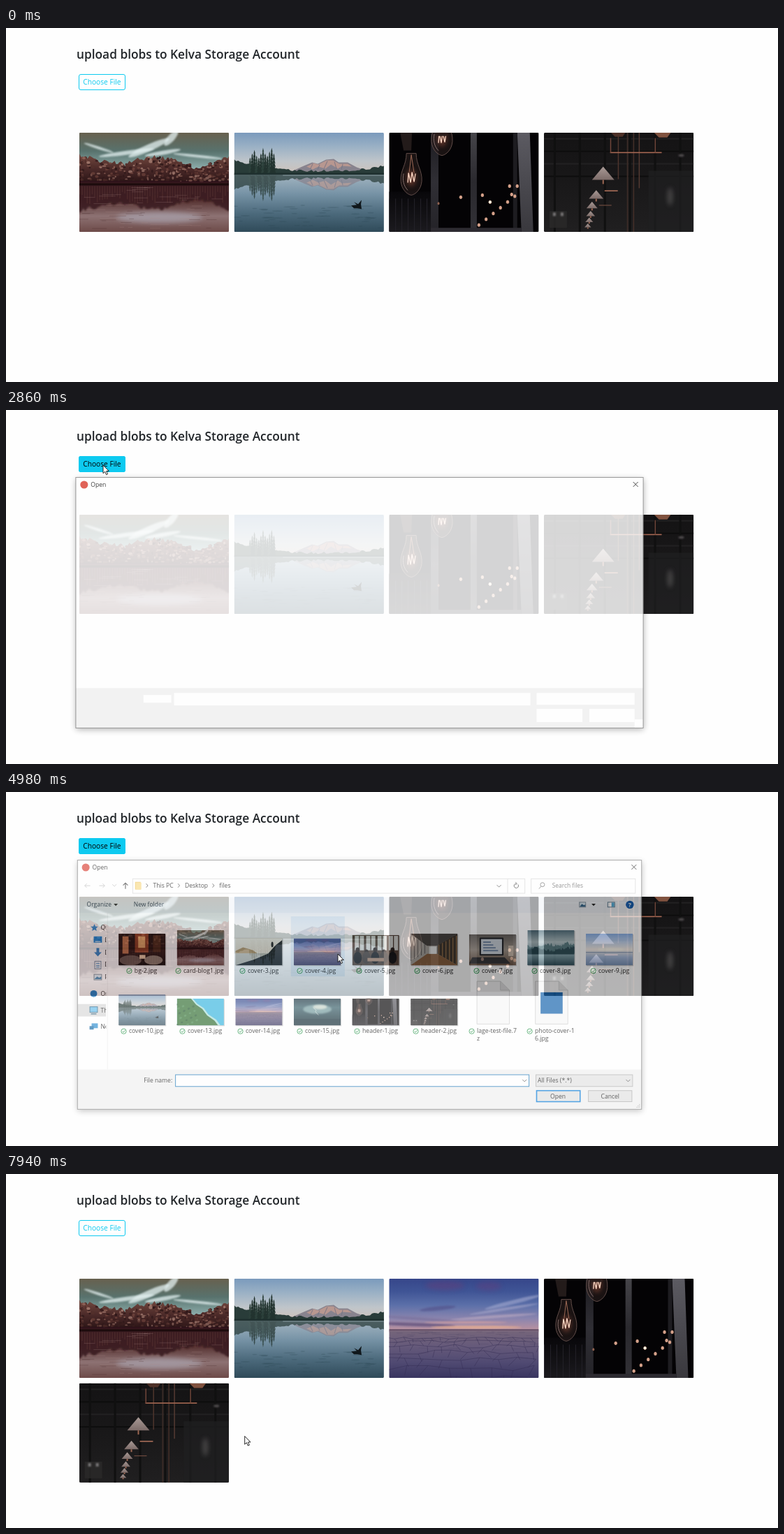
An HTML page that plays this animation: 1105 px wide and 507 px high, repeating every 8 s.

```html
<!DOCTYPE html>
<html lang="en">
<head>
<meta charset="utf-8">
<title>Blob upload</title>
<style>
html, body { margin: 0; width: 100%; height: 100%; overflow: hidden; background: #fefefe; }
svg { display: block; width: 100vw; height: 100vh; }
text { font-family: "Open Sans", "Noto Sans", sans-serif; white-space: pre; }
</style>
</head>
<body>
<svg id="stage" viewBox="0 0 1105 507"></svg>
<script>
const LOOP = 8000, CARD_W = 214.5, CARD_H = 142.5;
const clamp = v => Math.max(0, Math.min(1, v));
const ramp = (t, a, b) => clamp((t - a) / (b - a));
const smooth = p => p * p * (3 - 2 * p);

// Markup helpers
const rect = (x, y, w, h, fill, more = '') => `<rect x="${x}" y="${y}" width="${w}" height="${h}" fill="${fill}" ${more}/>`;
const oval = (x, y, rx, ry, fill, more = '') => `<ellipse cx="${x}" cy="${y}" rx="${rx}" ry="${ry}" fill="${fill}" ${more}/>`;
const path = (d, fill, more = '') => `<path d="${d}" fill="${fill}" ${more}/>`;
const line = (d, color, width = 1, more = '') => path(d, 'none', `stroke="${color}" stroke-width="${width}" ${more}`);
const text = (x, y, s, size = 8.7, fill = '#1a1a1a', more = '') => `<text x="${x}" y="${y}" font-size="${size}" fill="${fill}" ${more}>${s}</text>`;
const many = (n, f) => Array.from({ length: n }, (_, i) => f(i)).join('');
const soft = 'filter="url(#soft)"', mist = 'filter="url(#mist)"';

function random(seed) {
  return () => (seed = (seed * 16807) % 2147483647) / 2147483647;
}

const blur = (id, size) => `<filter id="${id}" x="-50%" y="-50%" width="200%" height="200%"><feGaussianBlur stdDeviation="${size}"/></filter>`;
let defs = blur('soft', 3) + blur('mist', 1.3) +
  '<filter id="shade" x="-5%" y="-5%" width="110%" height="115%"><feGaussianBlur stdDeviation="5"/></filter>' +
  `<clipPath id="card">${rect(0, 0, CARD_W, CARD_H, '#000', 'rx="2"')}</clipPath>` +
  '<clipPath id="loaded"><rect id="loadedBox" width="215" height="143"/></clipPath>' +
  `<clipPath id="nav">${rect(97, 172, 42, 227, '#000')}</clipPath>`;
let gradients = 0;

function fade(...colors) {
  const id = 'grad' + gradients++;
  defs += `<linearGradient id="${id}" x2="0" y2="1">` +
    colors.map((c, i) => `<stop offset="${i / (colors.length - 1)}" stop-color="${c}"/>`).join('') + '</linearGradient>';
  return `url(#${id})`;
}

function photo(id, body) {
  defs += `<symbol id="${id}" viewBox="0 0 215 143" preserveAspectRatio="none">${body}</symbol>`;
}

// Jagged skyline through evenly spaced heights, closed at the base
function ridge(heights, base, rough, seed) {
  const r = random(seed), n = heights.length - 1;
  let d = `M0 ${base}`;
  for (let x = 0; x <= 216; x += 3) {
    const u = Math.min(x / 215 * n, n - .001), i = Math.floor(u);
    const y = heights[i] + (heights[i + 1] - heights[i]) * (u - i) + (r() - .5) * rough;
    d += `L${x} ${y.toFixed(1)}`;
  }
  return d + `V${base}Z`;
}

function spruce(x, base, h, w) {
  let left = `M${x} ${base - h}`, right = '';
  for (let i = 1; i <= 6; i++) {
    const y = base - h + h * i / 6, half = w * (.25 + i / 8);
    left += `L${x - half} ${y}L${x - half * .4} ${y - 1.5}`;
    right = `L${x + half * .4} ${y - 1.5}L${x + half} ${y}` + right;
  }
  return left + right + 'Z';
}

function forest() {
  const r = random(71), tones = ['#6f443c', '#8d6156', '#3c1f1f', '#9f776c', '#2f1819', '#54302c'];
  const heights = [34, 38, 44, 45, 39, 35, 37, 46, 52, 43, 33];
  const trees = path(ridge(heights, 76, 8, 5), fade('#74493f', '#4a2928', '#241012'));
  const leaves = many(330, () => {
    const x = r() * 215, top = heights[Math.min(10, Math.round(x / 21.5))], depth = r();
    const tone = tones[Math.floor(r() * 6)];
    return oval(x.toFixed(1), (top + depth * (70 - top)).toFixed(1), 1 + r() * 2, .8 + r() * 1.5, tone, `opacity="${1 - depth * .45}"`);
  });
  const streaks = many(70, () => rect((r() * 205 - 5).toFixed(1), (78 + r() * 64).toFixed(1), 6 + r() * 22, .8, r() < .5 ? '#a88785' : '#3f2122', 'opacity=".3"'));
  const cloud = (x, y, rx, ry, a) => oval(x, y, rx, ry, '#e3f0f0', `transform="rotate(${a} ${x} ${y})" ${mist} opacity=".75"`);
  return rect(0, 0, 215, 80, fade('#67604e', '#58726d', '#8fb0ae', '#bccdca')) +
    cloud(68, 29, 40, 3, -8) + cloud(100, 22, 32, 5, -24) + cloud(132, 8, 14, 5, -48) + cloud(28, 22, 22, 2, 18) +
    cloud(120, 29, 26, 3, -10) + cloud(170, 34, 35, 2, 6) + trees + leaves +
    rect(0, 74, 215, 69, fade('#3d2022', '#54302f', '#8d7273', '#6d4a48')) +
    oval(115, 122, 62, 8, '#a8a0aa', `opacity=".75" ${soft}`) +
    `<g transform="translate(0 147) scale(1 -1)">${path(ridge(heights.map(h => h + 1), 76, 7, 9), '#3a1d20', `opacity=".9" ${mist}`)}</g>` +
    rect(0, 73, 215, 3, '#1c0b0c') + many(60, i => rect(i * 3.6, 77, 1.6, 8 + r() * 18, '#6a423e', 'opacity=".3"')) + streaks;
}

function lake() {
  const firs = many(12, i => path(spruce(23 + i * 3.1, 60, [24, 30, 35, 27][i % 4] + (i > 5 ? 3 : 0), 3.6), i % 3 ? '#22332f' : '#2c403b'));
  const hills = path(ridge([40, 46, 51, 53, 54, 55, 55, 55, 54, 52, 48], 61, 3, 12), '#293c39');
  const peak = path('M82 56L100 48L112 43L120 45L132 39L143 38L150 43L163 43L176 50L194 56Z', '#88838e') +
    path('M104 49L114 44L121 46L133 40L142 40L151 45L163 45L169 49L155 48L149 52L139 46L131 52L121 49L113 53Z', '#b89790') +
    line('M113 45l-4 8M123 46l-3 7M134 41l-5 11M144 42l3 10M156 45l-2 8', '#747383', 1.2, 'opacity=".7"');
  const shore = peak + hills + firs;
  const r = random(31);
  return rect(0, 0, 215, 62, fade('#7a9abc', '#9bb1c5', '#bfc5ca', '#d1c2b8')) + shore +
    rect(0, 60, 215, 83, fade('#a4b6c2', '#7793a6', '#4d6b7d', '#2f4a59')) +
    `<g transform="translate(0 121) scale(1 -1)" opacity=".72">${shore}</g>` +
    rect(0, 58, 215, 2.5, '#1f302f') + line('M70 61.5H215', '#a9bac3', .6) +
    many(50, () => oval(r() * 215, 103 + r() * 38, 3 + r() * 6, .8, '#2a4451', 'opacity=".25"')) +
    path('M168 105L176 104L172 100L178 103L183 97L182 103L183 110L177 109L172 109Z', '#10171b');
}

function bulb() {
  const glow = (x, y, s = 2.2) => oval(x, y, s, s * 1.2, '#d5a18a');
  const glass = (x, y) => `<g transform="translate(${x} ${y})">` +
    path('M-7 -32C-7 -15 -16 -8 -15 8C-14 20 -6 27 0 28C6 27 14 20 15 8C16 -8 7 -15 7 -32Z', '#241a1a', 'fill-opacity=".7" stroke="#6b5450" stroke-width=".9"') +
    oval(0, 3, 7, 12, '#8c4c3a', `opacity=".55" ${soft}`) + line('M-11 -3C-13 6 -11 15 -5 21', '#a08580', .8) +
    line('M-5 10L-4 -4L-1 10L1 -5L4 9L6 -3', '#ffd9c5', 1.3) + line('M-3 -5L0 -30L4 -4', '#9c6955', 1) + '</g>';
  return rect(0, 0, 215, 143, '#040305') +
    rect(0, 85, 62, 58, fade('#08070a', '#1b1a1e')) + many(7, i => rect(i * 9, 95, 1, 48, '#25232a')) +
    rect(60, 0, 11, 143, fade('#1c1b20', '#302f35', '#242328')) +
    rect(117, 0, 9, 143, fade('#454449', '#2a292e', '#323136')) +
    path('M184 0H202L207 143H190Z', fade('#5c5b62', '#4a494f', '#39383d')) +
    rect(178, 0, 6, 143, '#1d1c20') + rect(60, 137, 130, 6, '#2d2b31') +
    path('M16 0H33L32 26H21Z', '#231b1a') + glass(32, 62) + glass(76, 5) + rect(68, 0, 15, 5, '#2a1c1a') +
    many(6, i => glow(129 + i * 10.3, 133 - i * 8.3)) +
    [[103, 93], [134, 90], [173, 77], [184, 77], [145, 100], [176, 89]].map(p => glow(...p)).join('') +
    oval(145, 100, 2, 2, '#fff0df') + oval(71, 102, 1.5, 2, '#8f614f');
}

function lamps() {
  const cone = (x, y, s) => path(`M${x} ${y - 11 * s}L${x + 16 * s} ${y + 8 * s}H${x - 16 * s}Z`, fade('#a99a96', '#7d6c69')) +
    rect(x - 1, y + 8 * s, 2, 6 * s, '#9c6753');
  const copper = '#70463a';
  return rect(0, 0, 215, 143, fade('#141314', '#191819', '#201f20')) +
    many(4, i => rect(0, 8 + i * 18, 215, 2, i % 2 ? '#0d0d0d' : '#222122')) +
    many(6, i => rect(14 + i * 36, 0, 3, 143, '#101010')) +
    rect(150, 55, 65, 88, '#1f1f20', 'opacity=".75"') +
    oval(181, 92, 4, 13, '#565455', `opacity=".7" ${soft}`) + oval(197, 33, 4, 2, '#4d494b', mist) +
    rect(8, 113, 25, 24, '#2b2a2a', 'opacity=".8"') + many(2, i => rect(13 + i * 11, 115, 4, 5, '#777576', mist)) +
    rect(106, 0, 1.5, 67, '#4e352d') + rect(119, 0, 2, 143, '#3a2b27') + rect(128, 0, 1.5, 143, '#453029') + rect(136, 0, 1.5, 80, '#543a32') +
    rect(95, 28, 74, 1.6, '#a66853') + rect(95, 8, 1.5, 21, copper) + rect(159, 8, 1.5, 21, copper) +
    path('M96 0H117L113 6H102Z', '#4d3027') + path('M158 0H182L177 7H165Z', '#80523f') +
    rect(87, 83, 19, 1.6, '#a96e59') + rect(79, 104, 18, 1.2, '#6e4a3e') +
    cone(85, 60, 1) + cone(75, 90, .65) + cone(69, 105, .5) + cone(67, 117, .4) + cone(65, 126, .35) + cone(63, 134, .3);
}

function dusk() {
  const r = random(17);
  let cracks = '';
  for (let row = 2; row < 9; row++) {
    const y = 82 + row * row * .95, gap = 6 + row * 3.5;
    cracks += `M-5 ${y}`;
    for (let x = -5; x < 220; x += gap) {
      const jog = y + (r() - .5) * (1 + row);
      cracks += `L${x} ${jog}l${(r() - .5) * gap} ${1.9 * row + 1}M${x} ${jog}`;
    }
  }
  const cloud = (x, y, rx, ry, fill, a, o) => oval(x, y, rx, ry, fill, `transform="rotate(${a} ${x} ${y})" ${mist} opacity="${o}"`);
  return rect(0, 0, 215, 77, fade('#36468a', '#405596', '#5c70a9', '#8b85ae', '#c3949c')) +
    oval(80, 10, 28, 7, '#653d78', `opacity=".45" ${soft}`) + oval(143, 11, 18, 7, '#653d7c', `opacity=".4" ${soft}`) +
    cloud(70, 43, 26, 3, '#514f88', -6, .6) + cloud(178, 34, 42, 3, '#a3a9cf', -14, .6) + cloud(165, 44, 50, 2, '#aaa9cb', -9, .6) +
    cloud(150, 55, 62, 2, '#b8a7c0', -4, .7) + cloud(45, 58, 55, 2, '#7c739e', 4, .8) + cloud(35, 66, 60, 2.4, '#63527d', 2, .8) +
    cloud(110, 63, 60, 1.5, '#d6a2a1', 0, .7) + cloud(125, 70, 65, 2, '#e9b091', 0, .8) +
    rect(0, 73, 215, 2, '#594760') + rect(0, 75, 215, 68, fade('#75657a', '#65597a', '#504a72', '#393560')) +
    many(60, () => rect(r() * 205, 76 + r() * r() * 40, 4 + r() * 12, .6, '#4d4261', 'opacity=".4"')) +
    line(cracks, '#302b51', .7, 'opacity=".6"');
}

photo('forest', forest());
photo('lake', lake());
photo('bulb', bulb());
photo('lamps', lamps());
photo('dusk', dusk());
photo('room', rect(0, 0, 215, 143, fade('#160c0b', '#2b1512', '#0c0908')) + rect(18, 12, 28, 78, '#bd7149') + rect(75, 0, 62, 85, '#8c3b20') +
  rect(90, 12, 32, 52, '#e2a365') + rect(158, 8, 35, 75, '#492718') + oval(55, 120, 50, 23, '#615049') + oval(160, 119, 42, 21, '#86766a') + rect(96, 96, 27, 17, '#e6c6a3'));
photo('cliff', rect(0, 0, 215, 143, fade('#f1eee5', '#e9ded0', '#b8bdb9')) + path('M0 69L35 50L80 64L105 85H0Z', '#b09064') +
  rect(0, 80, 215, 63, '#b6b4aa') + path('M215 12L183 40L150 82L85 113L0 143H215Z', '#14171a') + oval(169, 35, 5, 14, '#171719'));
photo('team', rect(0, 0, 215, 143, '#554238') + many(4, i => rect(12 + i * 52, 4, 42, 68, '#d8d9d4') + rect(31 + i * 52, 4, 4, 68, '#49372e')) +
  many(5, i => oval(25 + i * 40, 70 + i % 2 * 10, 9, 12, '#2b211e') + oval(25 + i * 40, 107, 19, 28, i % 2 ? '#453a36' : '#181719')) + rect(70, 108, 75, 16, '#af8870'));
photo('hall', rect(0, 0, 215, 143, '#aaa59e') + path('M0 0H215L120 55H75Z', '#4b4743') + path('M215 0V143L123 91V52Z', '#40382f') +
  many(6, i => line(`M${130 + i * 16} ${50 - i * 8}V${93 + i * 10}`, '#b68858', 3)) + path('M0 143L76 91H123L215 143Z', '#88603f') +
  many(5, i => rect(i * 16, 12 + i * 7, 2, 110 - i * 15, '#353638')) + rect(85, 58, 33, 33, '#d9dad7'));
photo('desk', rect(0, 0, 215, 143, fade('#68635f', '#a59b90', '#6c5545')) + rect(48, 15, 110, 83, '#25282c', 'rx="4"') +
  rect(55, 22, 96, 69, '#d3dbe4') + many(4, i => rect(65, 33 + i * 13, 35 + i * 11, 6, '#768caa')) + path('M15 106H163L190 135H0Z', '#363638') + rect(180, 52, 23, 48, '#d2c2b2'));
photo('mistyLake', rect(0, 0, 215, 143, fade('#51717f', '#b5c6c9', '#688994', '#2d5260')) + path(ridge([66, 73, 61, 58, 66, 51, 62], 94, 12, 8), '#557a80') +
  path(ridge([80, 70, 78, 85, 77, 73, 68], 98, 11, 4), '#284952') + rect(0, 99, 215, 44, fade('#80a0a8', '#264753')));
photo('pale', rect(0, 0, 215, 143, fade('#87b0ea', '#c0d4f1', '#f8f0e8', '#9fb4d6', '#718bb0')) + rect(0, 83, 215, 3, '#758bab') + oval(115, 71, 60, 6, '#fffbef', soft));
photo('coast', rect(0, 0, 215, 143, '#38b6df') + path('M0 0H72L93 28L123 51L144 84L180 112L199 143H0Z', '#a8dfda') +
  path('M0 0H64L88 33L116 56L138 90L172 118L188 143H0Z', '#316d31') + many(50, i => oval(i * 37 % 95, 32 + i * 61 % 110, 5, 4, i % 2 ? '#438448' : '#205629')));
photo('storm', rect(0, 0, 215, 143, fade('#17313e', '#385f69', '#203e48', '#102630')) + oval(108, 57, 65, 24, '#729a9d', soft) +
  oval(120, 45, 32, 12, '#c9d6ca', soft) + line('M90 48L103 64L99 70L113 88', '#e4eee9', 2) + rect(0, 108, 215, 35, '#122c36'));

// name, picture, top edge, label start, second label line
const FILES = [
  ['bg-2.jpg', 'room', 202, 180], ['card-blog1.jpg', 'forest', 197, 251], ['cover-3.jpg', 'cliff', 208, 344],
  ['cover-4.jpg', 'dusk', 209, 427], ['cover-5.jpg', 'team', 204, 513], ['cover-6.jpg', 'hall', 202, 597],
  ['cover-7.jpg', 'desk', 203, 683], ['cover-8.jpg', 'mistyLake', 197, 767], ['cover-9.jpg', 'pale', 202, 852],
  ['cover-10.jpg', 'lake', 290, 172], ['cover-13.jpg', 'coast', 296, 257], ['cover-14.jpg', 'dusk', 296, 341],
  ['cover-15.jpg', 'storm', 296, 427], ['header-1.jpg', 'bulb', 296, 510], ['header-2.jpg', 'lamps', 296, 595],
  ['lage-test-file.7', '', 271, 676, 'z'], ['photo-cover-1', 'image', 271, 760, '6.jpg']
];

function sheet(x, y) {
  return path(`M${x} ${y}h34l13 13v49h-47Z`, '#f7f7f7', 'stroke="#d0d0d0"') + path(`M${x + 34} ${y}v13h13`, '#e5e5e5', 'stroke="#d0d0d0"');
}

function fileItem([name, pic, top, labelX, rest], i) {
  const x = 157 + i % 9 * 84.6, bottom = i < 9 ? 248 : 335, label = bottom + 11;
  let art;
  if (rest) art = sheet(x + 11.5, top) + (pic ? rect(x + 19, 287, 32, 31, '#1261ad') : '');
  else art = rect(x + 1, top + 1, 68, bottom - top, '#c9c9c9') + `<use href="#${pic}" x="${x}" y="${top}" width="68" height="${bottom - top}"/>`;
  return art + text(labelX, label, name, 8.8) + (rest ? text(labelX, label + 11, rest, 8.8) : '');
}

const tick = ([, , , x], i) => {
  const y = i < 9 ? 256 : 343.5;
  return `<circle cx="${x - 7.5}" cy="${y}" r="3.7" fill="#fff" stroke="#239447"/>` + line(`M${x - 9.4} ${y}l1.5 1.6l2.5 -3`, '#239447');
};

const chevron = (x, y, color = '#555') => line(`M${x - 3} ${y - 1.5}l3 3l3 -3`, color);
const crumb = x => line(`M${x - 1} 129.5l2.5 2.8l-2.5 2.8`, '#555');

function navPane() {
  const rows = [[193, 'Quick access', 131], [211, 'Desktop', 137], [229, 'Downloads', 137], [247, 'Documents', 137],
    [265, 'Pictures', 137], [289, 'Online', 131], [313, 'This PC', 131], [337, 'Network', 131]];
  return `<g clip-path="url(#nav)">${rect(97, 304, 42, 18, '#d9d9d9')}${rows.map(([y, s, x]) => text(x, y + 3, s)).join('')}` +
    path('M122 188l1.5 3.4l3.8 .4l-2.8 2.5l.8 3.7l-3.3 -1.9l-3.3 1.9l.8 -3.7l-2.8 -2.5l3.8 -.4Z', '#2b8bd8') +
    rect(121, 206, 12, 9, '#1683d8') + rect(123, 213, 8, 1, '#fff') +
    path('M125 223h4v6h3.5l-5.5 6l-5.5 -6h3.5Z', '#3385cc') +
    rect(122.5, 242, 9, 11, '#fff', 'stroke="#7890a5"') + line('M124.5 245h5M124.5 248h5M124.5 250.5h5', '#3d89c4') +
    rect(121.5, 261, 11, 8, '#dcecf5', 'stroke="#788894"') + path('M122 268l4 -4l3 2l3 -2v4Z', '#397caa') +
    `<circle cx="121" cy="289" r="5" fill="#0b6fbd"/>` +
    rect(115.5, 308, 11, 8, '#68bdea', 'stroke="#2d6688"') + rect(117, 317.5, 8, 1.5, '#3b6983') +
    rect(118, 332, 9, 7, '#2e8ed0') + rect(115, 336, 6, 5, '#176aa7') + '</g>';
}

function dialogContent() {
  return rect(97.5, 118, 817, 338, '#fff') +
    line('M116 132.5H108M111 129.5l-3 3l3 3M129 132.5h8M134 129.5l3 3l-3 3', '#c4c4c4') + chevron(151, 132, '#c4c4c4') +
    line('M167 137v-8M163.5 132l3.5 -3.5l3.5 3.5', '#444', 1.2) +
    rect(177.5, 122.5, 568, 21, '#fff', 'stroke="#d9d9d9"') + line('M720.5 122.5v21', '#d9d9d9') +
    rect(181, 127, 8, 11, '#efc65e') + rect(182, 128, 8, 10, '#f9dc8c') +
    crumb(198) + text(207, 135.5, 'This PC') + crumb(244) + text(253, 135.5, 'Desktop') + crumb(294) + text(303, 135.5, 'files') +
    chevron(708, 133) + line('M735.6 130.8a3.2 3.2 0 1 1 -3 -1.3M732 127.5l2 2l-2 2', '#444') +
    rect(754.5, 122.5, 151, 21, '#fff', 'stroke="#d9d9d9"') +
    `<circle cx="771" cy="131" r="3" fill="none" stroke="#777"/>` + line('M769 133.5l-3 3.5', '#777') + text(785, 135.5, 'Search files', 8.5, '#666') +
    rect(97.5, 149, 817, 23, '#f3f6fa') + text(111, 163, 'Organize', 8.6, '#25364a') + path('M150 158.5h6l-3 3.5Z', '#222') +
    text(179, 163, 'New folder', 8.6, '#25364a') +
    rect(824.5, 156.5, 9, 7, '#dcecf5', 'stroke="#8695a1"') + path('M825 163l3 -4l3 2l2 -1v3Z', '#31658c') + path('M842 158.5h6l-3 3.5Z', '#222') +
    rect(865.5, 156.5, 10, 7, '#fff', 'stroke="#58788e"') + rect(871, 157, 4, 6, '#53b1df') +
    `<circle cx="897.5" cy="160" r="5.8" fill="#0b59b0"/>` + text(897.5, 163.5, '?', 9, '#fff', 'text-anchor="middle" font-weight="700"') +
    line('M141 172V399', '#eeeeee') + navPane() + '<rect id="hover" y="177" width="78" height="87" fill="#e5f1fb"/>' +
    FILES.map(fileItem).join('') + `<g id="ticks1">${FILES.slice(0, 9).map(tick).join('')}</g>` +
    `<g id="ticks2">${FILES.slice(9).map((f, i) => tick(f, i + 9)).join('')}</g>` +
    rect(97.5, 399, 817, 57, '#f0f0f0') + text(235, 418, 'File name:', 8.7, '#1a1a1a', 'text-anchor="end"') +
    rect(239.5, 406.5, 512, 17, '#fff', 'stroke="#1976b8"') + chevron(745, 415) + '<path id="caret" d="M242.5 410V421" stroke="#111"/>' +
    rect(761.5, 406.5, 140, 17, '#e2e2e2', 'stroke="#b0b0b0"') + text(764, 418, 'All Files (*.*)') + chevron(895, 415) +
    rect(762.5, 429.5, 63, 16, '#e1e1e1', 'stroke="#0078d7" stroke-width="1.6"') + text(793.5, 440.5, 'Open', 8.7, '#111', 'text-anchor="middle"') +
    rect(837.5, 429.5, 63, 16, '#e1e1e1', 'stroke="#adadad"') + text(869, 440.5, 'Cancel', 8.7, '#111', 'text-anchor="middle"') +
    many(6, i => rect(911 - [0, 2, 4, 0, 2, 0][i], 453 - [0, 0, 0, 2, 2, 4][i], 1, 1, '#999'));
}

const skeleton = rect(97.5, 399, 817, 57, '#f0f0f0') + rect(195, 409, 40, 11, '#fff') + rect(239, 406, 513, 18, '#fff') +
  rect(761, 406, 141, 17, '#fff') + rect(761, 429, 66, 19, '#fff') + rect(837, 429, 65, 19, '#fff') + rect(902, 444, 12, 12, '#fff');

const trash = line('M191 18.5h12M195 18v-2h4v2M192.2 19l.9 10h7.8l.9 -10M195.2 21v6M197 21v6M198.8 21v6', '#fff', 1);
const PHOTOS = ['forest', 'lake', 'bulb', 'lamps', 'dusk'];

const body = text(101, 44, 'upload blobs to Kelva Storage Account', 17.3, '#212529', 'font-weight="600"') +
  rect(104.5, 66.5, 66, 22, 'none', 'rx="2.5" stroke="#0dcaf0"') + rect(104, 66, 67, 23, '#0dcaf0', 'rx="3" id="buttonFill"') +
  text(137.4, 81.4, 'Choose File', 10.2, '#0dcaf0', 'text-anchor="middle" id="buttonText"') +
  `<rect id="frame" x="548" y="149.5" width="215" height="143" rx="3" fill="#fff" stroke="#d5d7da"/>` +
  PHOTOS.map(p => `<g id="${p}Card"><g ${p === 'dusk' ? 'clip-path="url(#loaded)"' : ''}><use href="#${p}" width="${CARD_W}" height="${CARD_H}" clip-path="url(#card)"/></g></g>`).join('') +
  `<g id="dim">${rect(0, 0, CARD_W, CARD_H, '#000', 'rx="2" opacity=".52"')}${trash}</g>` +
  '<g id="dialog">' + rect(98, 98, 817, 361, '#000', 'opacity=".35" filter="url(#shade)"') +
  rect(97.5, 95.5, 817, 361, '#fff') + '<circle cx="109.5" cy="106" r="5.6" fill="#db4437"/>' + text(119, 109.3, 'Open') +
  line('M900 102l7 7M907 102l-7 7', '#222') + `<g id="skeleton">${skeleton}</g><g id="content">${dialogContent()}</g>` +
  rect(97.5, 95.5, 817, 361, 'none', 'stroke="#808080"') + '</g>' +
  '<g id="cursor">' + path('M0 0V11.7L2.7 9.2L4.6 13.6L6.6 12.7L4.7 8.5H8.3Z', '#fff', 'stroke="#111" stroke-width=".9" id="arrow"') +
  path('M2.6 1C2.6 -.4 4.6 -.4 4.7 1V6C6 5.2 7 5.7 7 6.5C8 5.8 9 6.3 9 7.2C10 6.7 10.8 7.2 10.8 8.2V11C10.8 13 9.5 13.6 9.5 16H4C3.8 14 1 12 0 9.7C-.4 8.4 1.2 7.8 2.6 9.8Z', '#fff', 'stroke="#222" stroke-width=".6" id="hand"') + '</g>';

const stage = document.getElementById('stage');
stage.innerHTML = `<defs>${defs}</defs>${body}`;
const el = {};
stage.querySelectorAll('[id]').forEach(node => el[node.id] = node);
const set = (id, name, value) => el[id].setAttribute(name, value);
const show = (id, on) => set(id, 'visibility', on ? 'inherit' : 'hidden');
const slotX = s => 104.7 + 221.75 * (s % 4);
const slotY = s => 149.7 + 149.7 * Math.floor(s / 4);
const place = (id, s) => set(id, 'transform', `translate(${slotX(s)} ${slotY(s)})`);

// start, end, from x, from y, to x, to y, steps
const MOVES = [
  [200, 970, 792, 365, 160, 82, 11], [1050, 1670, 160, 82, 139, 79, 8], [3740, 4510, 139, 79, 475, 232, 11],
  [5320, 5650, 475, 246, 681, 403, 5], [7520, 7940, 681, 403, 341.7, 375.5, 6]
];

function pointer(t) {
  const [a, b, x0, y0, x1, y1, n] = MOVES.filter(m => m[0] <= t).pop() || MOVES[0];
  const p = smooth(Math.floor(ramp(t, a, b) * n + .001) / n);
  return [x0 + (x1 - x0) * p, y0 + (y1 - y0) * p];
}

function draw(t) {
  const [x, y] = pointer(t);
  const uploaded = t >= 6310, open = t >= 2730 && t < 5120, loaded = t >= 3270;

  const fill = ramp(t, 900, 1050) - ramp(t, 5320, 5500);
  set('buttonFill', 'opacity', fill);
  set('buttonText', 'fill', `rgb(${[13, 202, 240].map(c => Math.round(c * (1 - fill)))})`);

  ['forest', 'lake', 'bulb', 'lamps'].forEach((p, i) => place(p + 'Card', uploaded && i > 1 ? i + 1 : i));
  place('duskCard', 2);
  show('frame', uploaded && t < 7330);
  show('duskCard', t >= 6840);
  set('loadedBox', 'height', t < 7330 ? 52 : 143);

  // The page notices the pointer only while it moves over it
  const awake = (t >= 200 && t < 2000) || t >= 5320;
  const slot = awake && y > 150 && y < 292.5 ? [0, 1, 2, 3].find(s => x >= slotX(s) && x <= slotX(s) + CARD_W) : undefined;
  const over = slot !== undefined;
  show('dim', over);
  if (over) place('dim', slot);

  show('dialog', open);
  const inward = 1 - (1 - ramp(t, 2660, 3000)) ** 2, outward = ramp(t, 4790, 5120) ** 2;
  const size = .965 + .035 * inward - .035 * outward;
  set('dialog', 'opacity', inward * (1 - outward));
  set('dialog', 'transform', `translate(506 276) scale(${size}) translate(-506 -276)`);
  show('skeleton', !loaded);
  show('content', loaded);
  show('ticks1', t >= 3420);
  show('ticks2', t >= 3480);
  show('caret', Math.floor((t - 3270) / 530) % 2 === 0);

  // Visible children would escape a hidden parent, so each state is inherited
  const column = Math.floor((x - 149.7) / 84.6), cellX = 152.2 + column * 84.6;
  show('hover', column >= 0 && y > 177 && y < 264 && x >= cellX && x <= cellX + 78);
  set('hover', 'x', cellX + .6);

  show('cursor', t >= 200);
  set('cursor', 'transform', `translate(${x} ${y})`);
  show('arrow', !over);
  show('hand', over);
}

const began = performance.now();
function tickFrame() {
  draw((performance.now() - began) % LOOP);
  requestAnimationFrame(tickFrame);
}
tickFrame();
</script>
</body>
</html>
```
